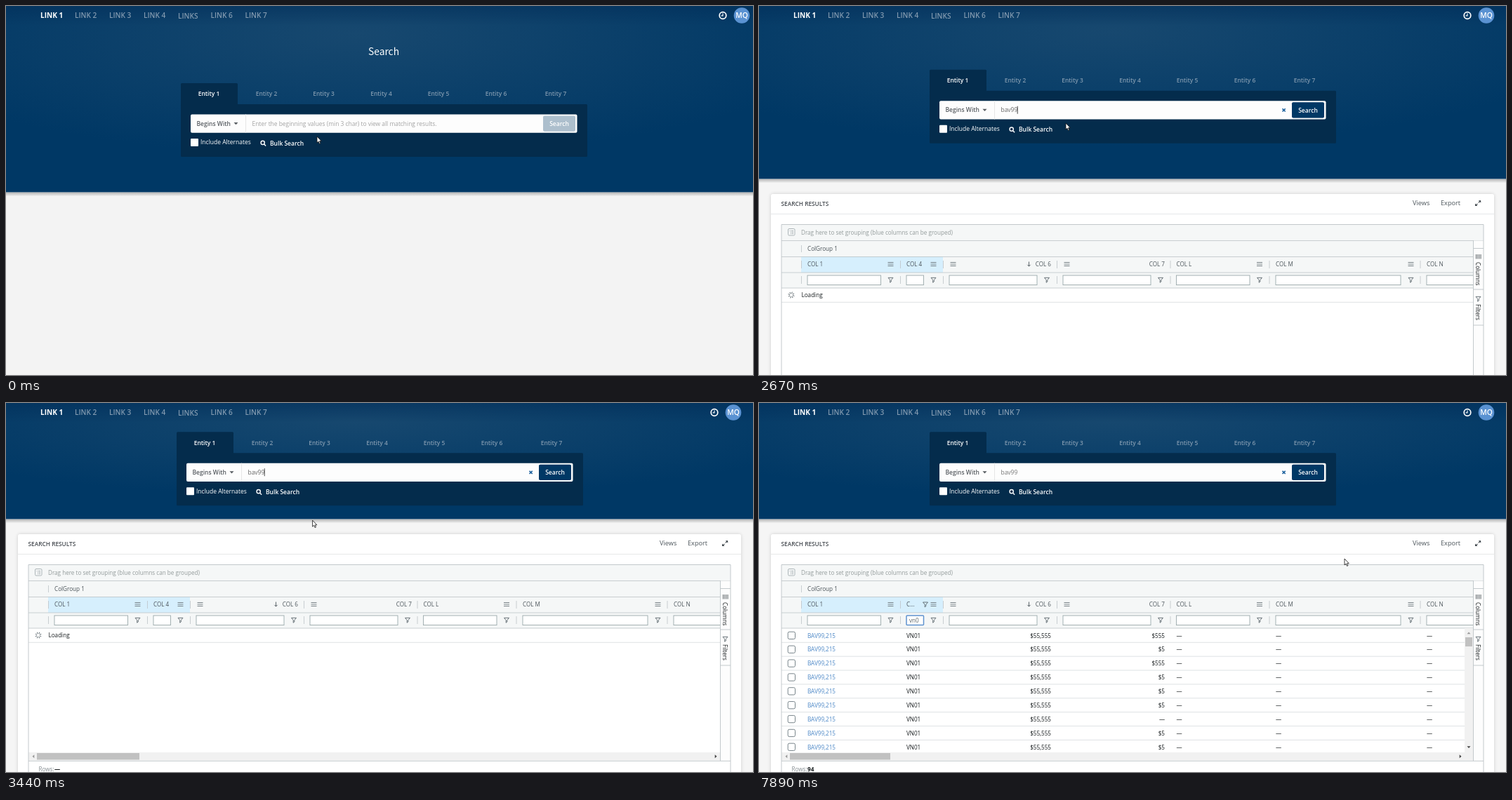
These frames come from a looping animation (1064 px wide and 526 px high, 8 s). An HTML page:

```html
<!DOCTYPE html>
<html lang="en">
<head>
<meta charset="utf-8">
<title>Search</title>
<style>
  html, body { margin: 0; height: 100%; overflow: hidden; background: #f3f3f3; }
  svg { display: block; width: 1064px; height: 526px; font-family: "Open Sans", "Noto Sans", sans-serif; }
  .title { font-family: "Noto Sans CJK JP", "Noto Sans CJK SC", "Noto Sans CJK", "Open Sans", sans-serif; }
</style>
</head>
<body>
<svg viewBox="0 0 1064 526">
  <defs>
    <radialGradient id="sky" cx=".47" cy=".15" r=".66">
      <stop stop-color="#17486f"/><stop offset="1" stop-color="#003865"/>
    </radialGradient>
    <linearGradient id="top" x2="0" y2="1">
      <stop stop-color="#002a55" stop-opacity=".45"/><stop offset="1" stop-color="#002a55" stop-opacity="0"/>
    </linearGradient>
    <linearGradient id="shade" x2="0" y2="1">
      <stop stop-color="#000" stop-opacity=".27"/><stop offset="1" stop-color="#000" stop-opacity="0"/>
    </linearGradient>
    <filter id="soft" x="-5%" y="-5%" width="110%" height="110%"><feGaussianBlur stdDeviation="2.5"/></filter>
    <clipPath id="rows"><path d="M32 321H1005V498H32Z"/></clipPath>
  </defs>
  <g id="scene"></g>
</svg>
<script>
const LOOP = 8000, OPEN = 2670, LOADED = 3510, FOCUS = 4100, FILTER = 5660, FILTERED = 6280;
const INK = '#181d1f', GREY = '#4c555b', LINE = '#bdc3c7', NAVY = '#042c4c';

const text = (s, x, y, fill = INK, size = 8.14, weight = 400, anchor = 'start', extra = '') =>
  `<text x="${x}" y="${y}" fill="${fill}" font-size="${size}" font-weight="${weight}" text-anchor="${anchor}" ${extra}>${s}</text>`;
const rect = (x, y, w, h, fill, extra = '') =>
  `<rect x="${x}" y="${y}" width="${w}" height="${h}" fill="${fill}" ${extra}/>`;
const stroke = (d, color, width = 1, extra = '') =>
  `<path d="${d}" fill="none" stroke="${color}" stroke-width="${width}" ${extra}/>`;
const shape = (d, fill) => `<path d="${d}" fill="${fill}"/>`;
const group = (x, y, body) => `<g transform="translate(${x} ${y})">${body}</g>`;
const each = (list, fn) => list.map(fn).join('');
const clamp = v => Math.max(0, Math.min(1, v));
const blink = (t, since) => Math.floor((t - since) / 530) % 2 === 0;
const typed = (t, times) => times.filter(k => t >= k).length;

const menu = x => stroke(`M${x - 4} 284.5h8m-8 2.5h8m-8 2.5h8`, '#6d777c', .9);
const funnel = (x, y) => stroke(`M${x - 3.5} ${y - 3}h7l-2.7 3.3v2.4l-1.6 1.2v-3.6Z`, '#59646a', .9);

function header(t, bottom) {
  const links = [['LINK 1', 49], ['LINK 2', 98], ['LINK 3', 147], ['LINK 4', 196], ['LINKS', 245], ['LINK 6', 291.5], ['LINK 7', 340.5]];
  const icons = stroke('M1025.8 13.5a4.8 4.8 0 1 1-9.6 0a4.8 4.8 0 1 1 9.6 0', '#fff', 1.7)
    + stroke('M1021 10.5v3.4h-2.4', '#fff', 1.1)
    + '<circle cx="1048" cy="13.5" r="11.3" fill="#5a92d2"/>'
    + text('MQ', 1048, 17.4, '#fff', 10.3, 600, 'middle');
  return rect(0, bottom, 1064, 6, 'url(#shade)')
    + rect(0, 0, 1064, bottom, 'url(#sky)') + rect(0, 0, 1064, 28, 'url(#top)')
    + each(links, ([s, x], i) => text(s, x, i === 4 ? 18.2 : 17.4, i ? '#8199af' : '#fff', 10.1, i ? 600 : 700))
    + group(t < OPEN ? 0 : -12, 0, icons)
    + (t < OPEN ? text('Search', 538, 70, '#fff', 13.8, 400, 'middle', 'class="title"') : '');
}

function searchBox(t) {
  const keys = [930, 1280, 1460, 1800, 2140], n = typed(t, keys);
  const since = n === 5 ? 2160 : n ? keys[n - 1] : 540;
  const caretX = 350.5 + [0, 5.2, 9.9, 14.1, 18.9, 23.7][n];
  const caret = t >= 540 && t < FOCUS && blink(t, since);
  const ready = clamp((t - 1460) / 200);
  return rect(249, 110, 81, 32, NAVY, 'rx="1.5"') + rect(249, 140, 579, 75, NAVY, 'rx="1.5"')
    + each([289, 371, 452.5, 534.5, 616, 698, 783], (x, i) =>
      text('Entity ' + (i + 1), x, 128.4, i ? '#7f98ae' : '#fff', 8.45, 600, 'middle'))
    + rect(263, 154.4, 550.5, 26.4, '#fdfdfd', 'rx="2"') + stroke('M341.5 154.4v26.4', '#e6e6e6')
    + text('Begins With', 271.5, 170.6, '#575c61', 8.5, 600) + shape('M324.5 166h6l-3 3.2Z', '#575c61')
    + (n ? text('bav99'.slice(0, n), 350.5, 170.6, t < FOCUS ? '#666' : '#777', 8.45)
         + stroke('M751.5 165.6l4.2 4.2m0-4.2l-4.2 4.2', '#1f639f', 1.6)
         : text('Enter the beginning values (min 3 char) to view all matching results.', 350.5, 170.6, '#a3a3a3', 8.42))
    + (caret ? stroke(`M${caretX} 162v11`, '#333', .9) : '')
    + rect(765, 156.5, 46, 22.3, '#adbfcd', 'rx="2"')
    + rect(765, 156.5, 46, 22.3, '#003865', `rx="2" opacity="${ready}"`)
    + text('Search', 788, 170.8, '#fff', 8.5, 600, 'middle')
    + rect(263, 189, 11, 11, '#fff', 'rx="1"') + text('Include Alternates', 277, 197.4, '#fff', 8.5)
    + stroke('M368.3 194.9a2.6 2.6 0 1 1-5.2 0a2.6 2.6 0 1 1 5.2 0m-.8 1.9l2.6 2.6', '#fff', 1.4)
    + text('Bulk Search', 376, 198.6, '#fff', 8.5, 600);
}

function columnHeads(t) {
  const filtered = t >= FILTER;
  const focus = t >= FOCUS;
  const inputs = [[69, 104.5], [210, 24.5], [271, 125], [433, 125], [594.5, 104.5], [736, 178], [951, 70]];
  const n = typed(t, [4270, 4480, 4740, 5130]);
  const word = t >= 6490 ? 'vn0' : 'vn01'.slice(0, n);
  const since = n === 4 ? 5130 : n ? [4270, 4480, 4740][n - 1] : FOCUS;
  const caretX = 212.8 + [0, 4.1, 9.1, 13.8, 18.6][n];
  return rect(32, 230, 1000, 91, '#f5f7f7') + rect(60, 276, 202, 23, '#d6effd')
    + stroke('M32 253.5H1032M32 276.5H1017M32 299H1017M32 321H1017', LINE, .8)
    + stroke('M60.5 260v10', LINE, .8)
    + each([60.5, 201.5, 262.5, 424.5, 586, 727, 942], x => stroke(`M${x} 282v11m0 11v11`, LINE, .8))
    + rect(41.5, 236.5, 9.5, 9.5, 'none', 'rx="1.5" stroke="#a4adb0" stroke-width=".9"')
    + stroke('M43.5 239.5h1.2m1 0h3.3m-4.3 2h1m.8 0h2.5m-4.3 2h1m.8 0h2.5', '#a4adb0', .9)
    + text('Drag here to set grouping (blue columns can be grouped)', 60, 244.5, '#939b9b')
    + text('ColGroup 1', 69, 267.9, GREY)
    + text('COL 1', 69, 290, GREY) + text(filtered ? 'C...' : 'COL 4', 210, 290, GREY)
    + (filtered ? funnel(237, 287) : '')
    + stroke('M384.5 283.5v6.5m-2.2-2.2l2.2 2.3l2.2-2.3', GREY, .9)
    + text('COL 6', 416, 290, GREY, 8.14, 400, 'end') + text('COL 7', 578, 290, GREY, 8.14, 400, 'end')
    + text('COL L', 594.5, 290, GREY) + text('COL M', 736, 290, GREY) + text('COL N', 951, 290, GREY)
    + each([187.5, 248.5, 276.5, 438.5, 713, 928.5], menu)
    + each([187.5, 248.5, 410, 572, 713, 928.5], x => funnel(x, 309.3))
    + each(inputs, ([x, w], i) => rect(x, 303, w, 13.6, '#fff',
      i === 1 && focus ? 'rx="1" stroke="#5f93cf" stroke-width="1.5"' : 'stroke="#9aa8aa" stroke-width=".9"'))
    + text(word, t >= 6490 ? 214 : 212.8, 312.6, '#5c6468')
    + (focus && blink(t, since) ? stroke(`M${caretX} 304.5v10.5`, '#333', .8) : '');
}

function rows(t) {
  if (t < LOADED || (t >= FILTER && t < FILTERED)) {
    const spokes = each([0, 1, 2, 3, 4, 5, 6, 7], i =>
      `<path d="M0-2V-4.6" stroke="#59646a" stroke-width=".9" transform="rotate(${i * 45 + t * .36})"/>`);
    return group(46, 331, spokes) + text('Loading', 60.5, 334.2) + stroke('M32 341.3H1017', '#d6dbdd', .8);
  }
  const done = t >= FILTERED;
  const codes = 'SG06 SG03 US02 SG06 SG03 SG03 SG03 SG03 HU08'.split(' ');
  const costs = (done ? '$555 $5 $555 $5 $5 $5 — $5 $5' : '$5 — $5 $5 — — — — $5').split(' ');
  return '<g clip-path="url(#rows)">' + each(codes, (code, i) => group(0, i * 19.87,
    rect(41.2, 326.2, 10.3, 10.3, '#fff', 'rx="2" stroke="#78848a" stroke-width="1"')
    + text('BAV99,215', 69, 334.6, '#4b87c6') + text(done ? 'VN01' : code, 210, 334.6)
    + text('$55,555', 416, 334.6, INK, 8.14, 400, 'end') + text(costs[i], 578, 334.6, INK, 8.14, 400, 'end')
    + each([594.5, 736, 951], x => text('—', x, 334.6))
    + stroke('M32 341.3H1005', '#d6dbdd', .8))) + '</g>'
    + rect(1005, 321, 12, 177, '#f1f1f1') + rect(1006, 334, 10, 13, '#c1c1c1')
    + shape('M1008.5 329.3h5l-2.5-2.8Z', '#999') + shape('M1008.5 489.2h5l-2.5 2.8Z', '#444');
}

function results(t) {
  const loading = t < LOADED || (t >= FILTER && t < FILTERED);
  const end = loading ? 1017 : 1005;
  return rect(17, 187, 1030, 400, '#000', 'rx="3" opacity=".16" filter="url(#soft)"')
    + rect(17, 187, 1030, 400, '#fff', 'rx="2.5"') + stroke('M17 215.5H1047', '#e6e8e9')
    + text('SEARCH RESULTS', 31.5, 204, '#464b51', 8.3, 600)
    + text('Views', 931, 203.3, GREY, 9.2) + text('Export', 971, 203.3, GREY, 9.2)
    + stroke('M1024.8 199.4l2.8-2.8M1023.4 200.8l-2.8 2.8', '#3f474c', 1.2)
    + shape('M1024.8 196.2h3.4v3.4ZM1023.4 204h-3.4v-3.4Z', '#3f474c')
    + columnHeads(t) + rows(t)
    + rect(32, 498, 985, 11.5, '#f1f1f1') + rect(44, 499, loading ? 146 : 143, 9.5, '#c1c1c1')
    + shape('M40.3 501.2v5l-2.8-2.5Z', '#999') + shape(`M${end - 7.3} 501.2v5l2.8-2.5Z`, '#444')
    + rect(1017.5, 253.5, 14.5, 257, '#fdfdfd')
    + stroke('M1017.5 253V510M1017.5 264.5H1032M1017.5 323H1032M1017.5 374H1032', LINE, .9)
    + stroke('M1021.5 273v6.5m2.2-6.5v6.5m2.2-6.5v6.5m2.2-6.5v6.5', '#4d565b', .9)
    + text('Columns', 0, 0, INK, 8.14, 400, 'start', 'transform="translate(1021.3 284) rotate(90)"')
    + funnel(1024.5, 336.3)
    + text('Filters', 0, 0, INK, 8.14, 400, 'start', 'transform="translate(1021.3 344) rotate(90)"')
    + stroke('M32 600V230.5H1032V600M32 510.3H1032', LINE, .9)
    + text('Rows:', 46.5, 525.2, '#858d91')
    + text(loading ? '—' : t < FILTER ? '3097' : '94', 69, 525.2, INK, 8.14, 700);
}

const path = [[0, 443, 186], [130, 443, 186], [390, 437, 167], [LOADED - 70, 437, 167], [3650, 352, 205], [3810, 300, 250],
  [4000, 214, 313], [6200, 214, 313], [6350, 231, 312], [6490, 236, 312], [6690, 247, 311], [7400, 247, 311],
  [7690, 703, 303], [7830, 800, 241], [7890, 834, 222], [LOOP, 834, 222]];

function pointer(t) {
  const i = path.findIndex(k => k[0] > t), [a, x, y] = path[i - 1], [b, u, v] = path[i];
  const p = (t - a) / (b - a), px = x + (u - x) * p, py = y + (v - y) * p;
  const beam = t < OPEN ? py < 181 : px > 209 && px < 235 && py > 302 && py < 318;
  return group(px, py, beam
    ? stroke('M-2.2-5H-.5L0-4.5L.5-5H2.2M0-4.5V4.5M-2.2 5H-.5L0 4.5L.5 5H2.2', '#111', 1)
    : '<path d="M0 0V9l2-1.8 1.5 3.2 1.4-.6-1.4-3.1h2.8Z" fill="#fff" stroke="#111" stroke-width=".8"/>');
}

function draw(t) {
  // The header closes in three hard steps.
  const open = t >= OPEN, p = clamp(Math.floor((t - OPEN) / 78) / 3);
  const drop = 81 * (1 - p), bottom = open ? 165.4 + drop : 265.4;
  return (open ? rect(0, 0, 1064, 526, '#f5f5f5') + group(0, drop, results(t)) : '')
    + header(t, bottom)
    + group(open ? -6 : 0, open ? -19.25 - 49.5 * p : 0, searchBox(t))
    + pointer(t);
}

const scene = document.getElementById('scene'), start = performance.now();
let last = '';
function frame() {
  const now = draw((performance.now() - start) % LOOP);
  if (now !== last) scene.innerHTML = last = now;
  requestAnimationFrame(frame);
}
frame();
</script>
</body>
</html>
```
